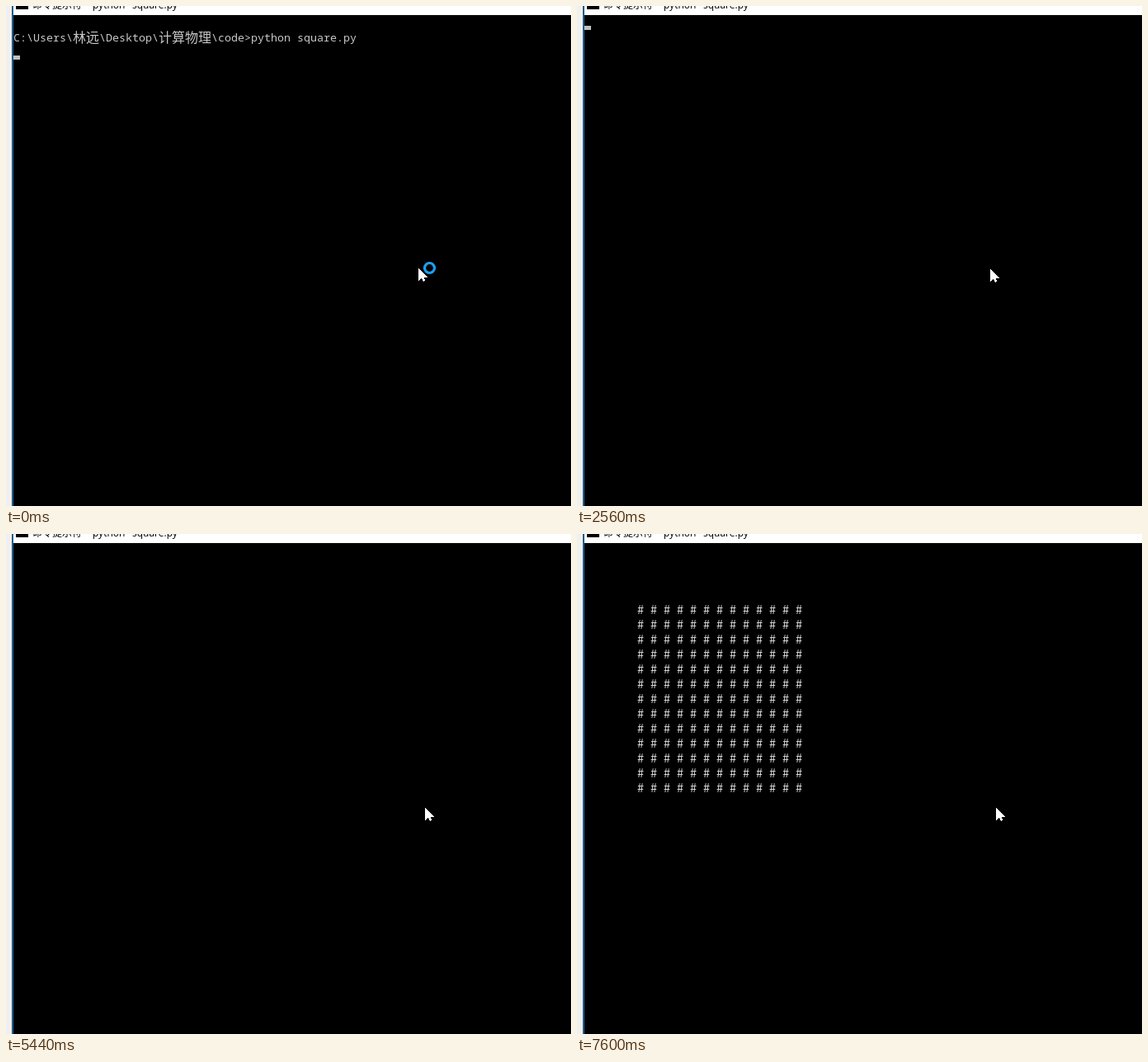
Write an HTML page that moves like this. It is 685x606 px and loops after 8 s.

```html
<!DOCTYPE html>
<html lang="zh">
<head>
<meta charset="utf-8">
<title>Growing square</title>
<style>
  html, body { margin: 0; width: 100%; height: 100%; overflow: hidden; background: #000; }
  svg { display: block; width: 685px; height: 606px; }
  .title { font: 12px "Open Sans", "Noto Sans CJK SC", "Noto Sans CJK", sans-serif; fill: #000; }
  .latin { font: 300 13.333px "Noto Sans Mono", "Liberation Mono", monospace; fill: #c8c8c8; }
  .han { font: 300 16px "Noto Sans CJK SC", "Noto Sans CJK", sans-serif; fill: #c8c8c8; }
  .hash { font: 14.5px "Noto Sans CJK SC", "Noto Sans CJK", sans-serif; text-anchor: middle; fill: #e0e0e0; }
</style>
</head>
<body>
<svg viewBox="0 0 685 606">
  <rect width="685" height="606"/>
  <rect width="7" height="606" fill="#f0f0ee"/>
  <rect x="7" width="1" height="606" fill="#27506f"/>
  <rect x="8" width="1" height="606" fill="#1668a8"/>
  <rect x="9" width="676" height="11" fill="#fff"/>
  <rect x="12" width="15" height="4"/>
  <text class="title" x="32" y="3">命令提示符</text>
  <text class="title" x="95" y="3">-</text>
  <text class="title" x="105" y="3">python</text>
  <text class="title" x="153" y="3">square.py</text>

  <g id="command">
    <text class="latin" x="9" y="43">C:\Users\</text>
    <text class="han" x="81" y="44">林远</text>
    <text class="latin" x="113" y="43">\Desktop\</text>
    <text class="han" x="185" y="44">计算物理</text>
    <text class="latin" x="249" y="43">\code&gt;python square.py</text>
  </g>
  <g id="square"></g>
  <rect id="caret" x="9" width="8" height="5" fill="#c0c0c0"/>
  <circle id="busy" cx="513.5" cy="317.5" r="6" fill="none" stroke="#1b9ff2" stroke-width="3.2"/>
  <path id="pointer" fill="#fff" shape-rendering="crispEdges"
        d="M0 0H1L10.5 10V11H6.5L8.3 15L6 16.2L3.6 11.5L0 15Z"/>
</svg>
<script>
const LOOP = 8000, TICK = 80;
const LINE = 18, STEP = 16, CENTRE_X = 173, CENTRE_Y = 200;
const FIRST_PRINT = 1600, PRINT_DELAY = 160, BUSY_END = 320;

// the screen is cleared before each larger square
const clears = [2560, 3360, 4400, 5440, 6560, 7440];
const caretSpans = [[0, 240], [640, 1200], [2560, 2640], [3360, 3440], [4320, 4400], [6320, 6560]];

const $ = id => document.getElementById(id);
const show = (id, on) => $(id).setAttribute("visibility", on ? "visible" : "hidden");
const span = (n, f) => Array.from({ length: n }, (_, i) => f(i - (n - 1) / 2));

let drawn = "";
function drawSquare(size, centreY) {
  const key = size + ":" + centreY;
  if (key === drawn) return;
  drawn = key;
  const xs = span(size, i => CENTRE_X + i * STEP).join(" ");
  $("square").innerHTML = span(size, i =>
    `<text class="hash" x="${xs}" y="${centreY + 5 + i * LINE}">${"#".repeat(size)}</text>`).join("");
}

function render(time) {
  const t = Math.floor(time / TICK) * TICK;
  const round = clears.filter(c => c <= t).length;
  const printAt = round ? clears[round - 1] + PRINT_DELAY : FIRST_PRINT;
  const printed = t >= printAt;

  // the first square is printed below the two command lines
  const offset = round ? 0 : 2;
  drawSquare(printed ? 2 * round + 1 : 0, CENTRE_Y + offset * LINE);
  show("command", !round);

  const caretLine = offset + (printed ? 20 : 0);
  show("caret", caretSpans.some(([from, to]) => t >= from && t < to));
  $("caret").setAttribute("y", 24 + caretLine * LINE);

  const busy = t < BUSY_END;
  show("busy", busy);
  const moved = Math.min(1, Math.max(0, (t - 4880) / 160));
  const x = 501 - busy + Math.round(7 * moved);
  const y = 319 - busy + Math.round(13 * moved);
  $("pointer").setAttribute("transform", `translate(${x} ${y})`);
}

const start = performance.now();
function tick() {
  render((performance.now() - start) % LOOP);
  requestAnimationFrame(tick);
}
tick();
</script>
</body>
</html>
```
